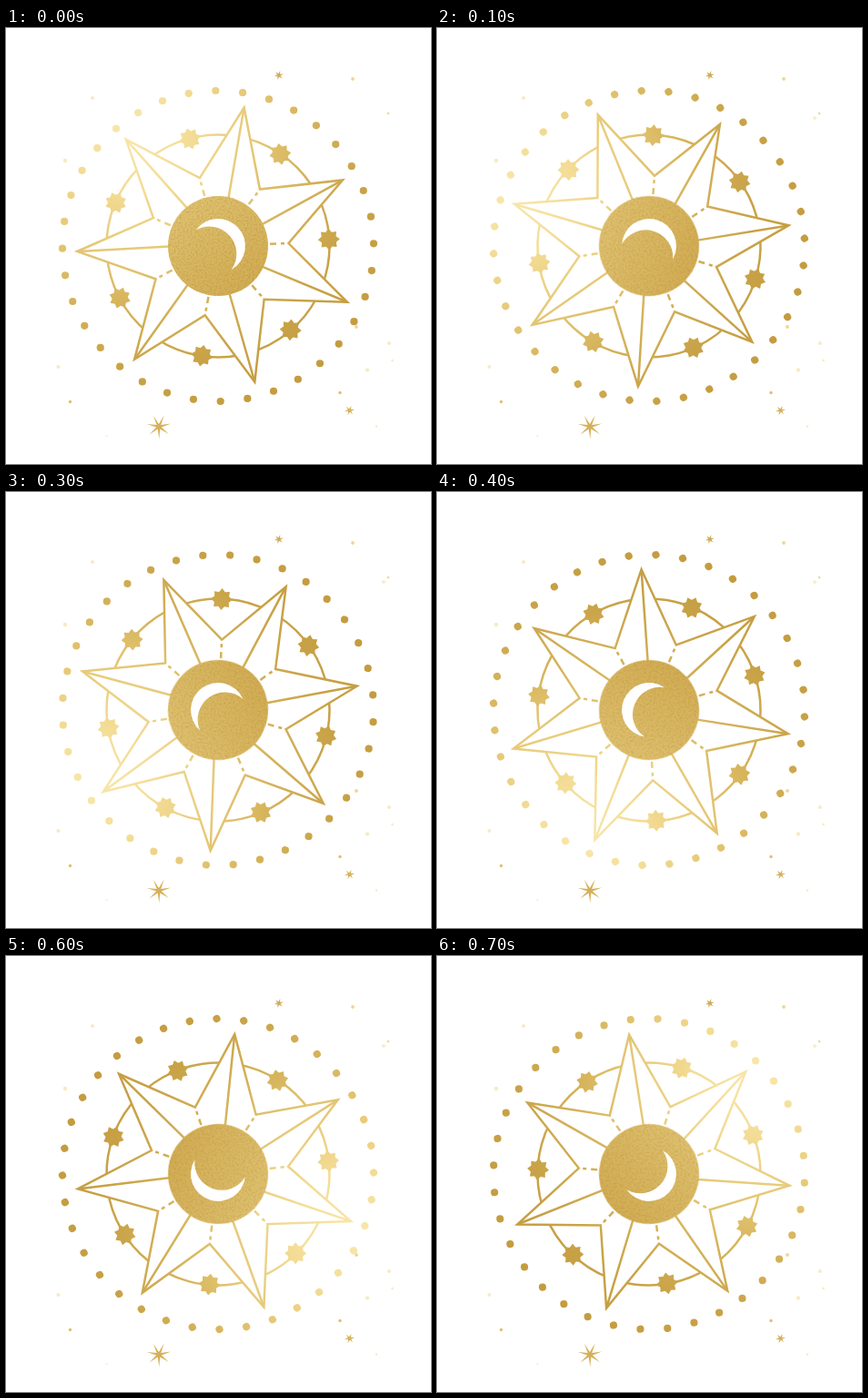
Write an HTML page that moves like this. It is 467 px wide and 480 px high and loops after 0.8 s.

```html
<!DOCTYPE html>
<html lang="en">
<head>
<meta charset="utf-8">
<title>Golden star wheel</title>
<style>
  html, body { margin: 0; width: 100%; height: 100%; overflow: hidden; background: #fff; }
  svg { display: block; width: 467px; height: 480px; }
</style>
</head>
<body>
<svg viewBox="0 0 467 480">
  <defs>
    <radialGradient id="foil" gradientUnits="userSpaceOnUse" cx="-98" cy="-130" r="350">
      <stop offset="0" stop-color="#f9e7ae"/>
      <stop offset=".2" stop-color="#f3dc95"/>
      <stop offset=".38" stop-color="#e6c978"/>
      <stop offset=".55" stop-color="#d6b45c"/>
      <stop offset=".75" stop-color="#c9a348"/>
      <stop offset="1" stop-color="#c39a3d"/>
    </radialGradient>
    <linearGradient id="disc" gradientUnits="userSpaceOnUse" x1="-33" y1="-44" x2="33" y2="44">
      <stop offset="0" stop-color="#e0c271"/>
      <stop offset="1" stop-color="#d3ae56"/>
    </linearGradient>
    <filter id="grain" x="0" y="0" width="1" height="1" color-interpolation-filters="sRGB">
      <feTurbulence type="fractalNoise" baseFrequency=".5" numOctaves="2" seed="4"/>
      <feColorMatrix values="0 0 0 0 .64  0 0 0 0 .48  0 0 0 0 .13  .8 0 0 0 -.32"/>
      <feComposite in2="SourceGraphic" operator="in" result="specks"/>
      <feMerge><feMergeNode in="SourceGraphic"/><feMergeNode in="specks"/></feMerge>
    </filter>
  </defs>
  <g id="sky"></g>
  <g id="wheel"></g>
</svg>
<script>
const NS = 'http://www.w3.org/2000/svg';
const sky = document.getElementById('sky');
const wheel = document.getElementById('wheel');
const FOIL = 'url(#foil)';
const POINTS = 7, STEP = 360 / POINTS, PHASE = 23.5;
const LINE = 2.5;
const STEP_MS = 100;
// counter-clockwise turn of the wheel at each step, in degrees
const TURN = [0, 31.9, 58.3, 84.7, 116.6, 156.6, 209.6, 275.9];

function add(parent, tag, attrs) {
  const el = document.createElementNS(NS, tag);
  for (const key in attrs) el.setAttribute(key, attrs[key]);
  return parent.appendChild(el);
}

function polar(r, deg, x = 0, y = 0) {
  const a = deg * Math.PI / 180;
  return [x + r * Math.cos(a), y + r * Math.sin(a)].map(v => +v.toFixed(2));
}

function starPath(n, outer, inner, deg, x = 0, y = 0) {
  const pts = [];
  for (let i = 0; i < 2 * n; i++) {
    pts.push(polar(i % 2 ? inner : outer, deg + i * 180 / n, x, y).join());
  }
  return 'M' + pts.join('L') + 'Z';
}

function line([x1, y1], [x2, y2], extra = {}) {
  add(wheel, 'line', { x1, y1, x2, y2, stroke: FOIL, 'stroke-width': LINE, ...extra });
}

function dot(parent, cx, cy, r, fill) {
  return add(parent, 'circle', { cx, cy, r, fill });
}

function buildWheel() {
  for (let i = 0; i < 36; i++) dot(wheel, ...polar(171, i * 10 - 0.9), 4.1, FOIL);

  add(wheel, 'circle', { r: 122.5, fill: 'none', stroke: FOIL, 'stroke-width': LINE });
  add(wheel, 'path', {
    d: starPath(POINTS, 155, 77.5, PHASE),
    fill: '#fff', stroke: FOIL, 'stroke-width': LINE, 'stroke-linejoin': 'miter'
  });

  const drift = [0, -2.3, 0, -0.5, 0.4, -2.3, -1.2];
  for (let i = 0; i < POINTS; i++) {
    const tip = PHASE + i * STEP, notch = tip + STEP / 2;
    line(polar(54, tip + 1.6), polar(153, tip));
    line(polar(57, notch), polar(73, notch), { 'stroke-dasharray': '7 5' });
    add(wheel, 'path', {
      d: starPath(8, 12, 8.6, notch, ...polar(122, notch + drift[i])), fill: FOIL
    });
  }

  add(wheel, 'circle', { r: 55, fill: 'url(#disc)', filter: 'url(#grain)' });
  add(wheel, 'path', {
    d: 'M-6.5-29.3A30 30 0 1 1-6.5 29.3A30 30 0 0 0-6.5-29.3Z',
    fill: '#fff', transform: 'rotate(-41.5)'
  });
}

function buildSky() {
  const gold = '#e0c06c', pale = '#f8ebc4', mid = '#efd692';
  add(sky, 'path', { d: starPath(7, 13.6, 2.9, -14, 168, 438.8), fill: '#d5b059' });
  add(sky, 'path', { d: starPath(6, 5.2, 1.9, -14, 299.8, 52), fill: '#cfac5c' });
  add(sky, 'path', { d: starPath(6, 5.6, 1.9, -10, 377.5, 421), fill: '#d6b25e' });
  [
    [381, 56, 1.9, mid], [420, 94, 1.3, mid], [95, 77, 2.1, pale], [65, 146, 2.3, pale],
    [57.5, 373, 2.1, pale], [70.5, 411.5, 1.7, gold], [110.5, 449, 1.1, pale],
    [367, 401.5, 1.7, gold], [397, 376.5, 2.2, pale], [421, 347, 2.1, pale],
    [424.5, 366, 1.3, pale], [407, 438.5, 1.3, pale], [385, 329, 1.9, mid]
  ].forEach(d => dot(sky, ...d));
  return add(sky, 'path', { d: starPath(4, 3.2, 1.3, 0, 415, 99), fill: pale });
}

buildWheel();
const sparkle = buildSky();

function draw(now) {
  const step = Math.floor(now / STEP_MS) % TURN.length;
  wheel.setAttribute('transform', `translate(233 240) rotate(${-TURN[step]})`);
  sparkle.setAttribute('visibility', step ? 'visible' : 'hidden');
}

const start = performance.now();
function tick() {
  draw(performance.now() - start);
  requestAnimationFrame(tick);
}
tick();
</script>
</body>
</html>
```
